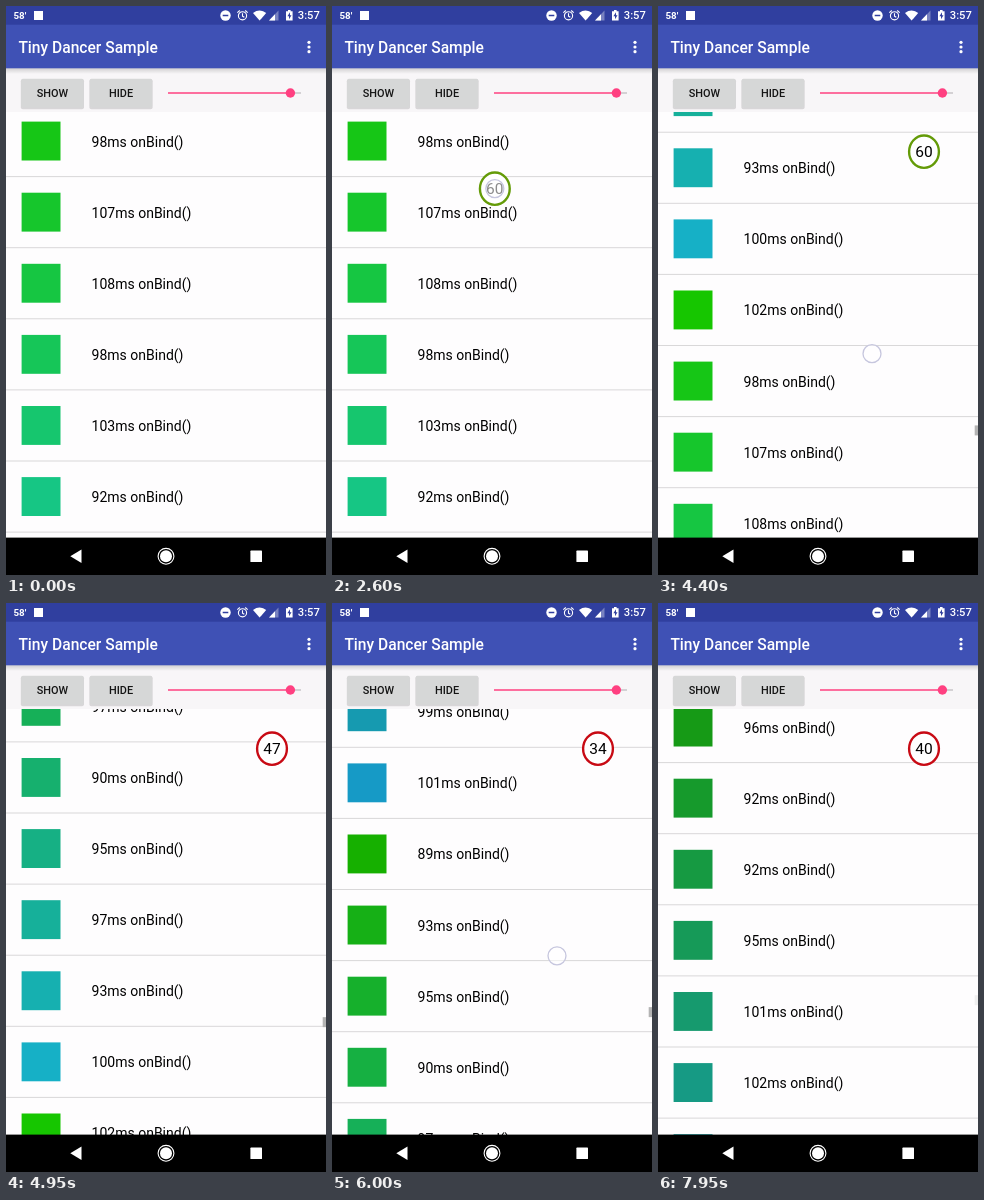
Write an HTML page that moves like this. It is 320x569 px and loops after 8000 ms.

```html
<!DOCTYPE html>
<html lang="en">
<head>
<meta charset="utf-8">
<title>Tiny Dancer Sample</title>
<style>
html, body { margin: 0; width: 100%; height: 100%; overflow: hidden; background: #fff; }
svg { display: block; width: 100vw; height: 100vh; font-family: Roboto, Inter, sans-serif; }
.caps { font-size: 10.9px; font-weight: 500; text-anchor: middle; fill: #141414; }
</style>
</head>
<body>
<svg viewBox="0 0 320 569" preserveAspectRatio="none">
  <defs>
    <clipPath id="listClip"><rect y="106" width="320" height="426"/></clipPath>
    <linearGradient id="shade" x2="0" y2="1">
      <stop stop-color="#000" stop-opacity=".16"/>
      <stop offset="1" stop-color="#000" stop-opacity="0"/>
    </linearGradient>
  </defs>
  <rect width="320" height="569" fill="#fefdfe"/>
  <g clip-path="url(#listClip)"><g id="list" font-size="14"></g></g>
  <rect id="scrollbar" x="316.7" width="3.3" height="10" fill="#b4b4b4"/>

  <rect y="62" width="320" height="44" fill="#f8f6f8"/>
  <rect y="62" width="320" height="6" fill="url(#shade)"/>
  <g id="buttons"></g>
  <path d="M284 87H295" stroke="#c4c2c4" stroke-width="1.4"/>
  <path d="M162 87H284" stroke="#ff4081" stroke-width="1.5"/>
  <circle cx="284.4" cy="87" r="4.7" fill="#ff4081"/>

  <rect width="320" height="62.3" fill="#3f51b5"/>
  <rect width="320" height="18.7" fill="#303f9f"/>
  <text x="12.4" y="46.7" font-size="15.6" font-weight="500" fill="#fff">Tiny Dancer Sample</text>
  <g fill="#fff">
    <circle cx="303" cy="36.3" r="1.6"/><circle cx="303" cy="41" r="1.6"/><circle cx="303" cy="45.7" r="1.6"/>
    <text x="7.5" y="13" font-size="9.8" font-weight="700">58'</text>
    <rect x="28" y="5" width="9" height="9"/>
    <circle cx="219.5" cy="9.5" r="5.2"/>
    <path d="M216.7 9.5h5.6" stroke="#303f9f" stroke-width="1.5"/>
    <g fill="none" stroke="#fff" stroke-width="1.1">
      <circle cx="236.5" cy="9.8" r="4.1"/>
      <path d="M236.5 7.3v2.8l1.8 1.2M231.3 6.6l2.5-2.1M241.7 6.6l-2.5-2.1"/>
    </g>
    <path d="M247 7Q253.6 2.2 260.2 7L253.6 14.6Z"/>
    <path d="M263 14.4L272.5 4.6V14.4Z" opacity=".35"/>
    <path d="M263 14.4L269 8.2V14.4Z"/>
    <path d="M280 5.2h2v-1.1h2.6v1.1h2v9.2H280Z"/>
    <path d="M284 6.2l-2.6 4h1.6v3l2.5-4h-1.5Z" fill="#303f9f"/>
    <text x="291.8" y="13.4" font-size="11.2" font-weight="500">3:57</text>
  </g>

  <rect y="531.6" width="320" height="37.4"/>
  <g fill="#fff">
    <path d="M64.3 550.3L75.5 543.6V557Z"/>
    <circle cx="160" cy="550.3" r="6"/>
    <circle cx="160" cy="550.3" r="7.9" fill="none" stroke="#fff" stroke-width="1.1"/>
    <rect x="244.4" y="544.5" width="11.6" height="11.6" rx=".7"/>
  </g>

  <g id="meter">
    <ellipse id="ring" rx="14.9" ry="16.2" fill="#fff" stroke-width="2.4"/>
    <text id="fps" y="5.6" font-size="15.5" text-anchor="middle"></text>
  </g>
  <circle id="finger" r="9" fill="#fff" fill-opacity=".55" stroke="#c6c6de" stroke-width="1.3"/>
</svg>
<script>
const LOOP = 8000, PITCH = 71.1, FIRST_Y = 135, FIRST_COLOR = 191;
const $ = id => document.getElementById(id);
const clamp = x => Math.max(0, Math.min(1, x));
const smooth = x => x * x * (3 - 2 * x);
const ramp = (t, a, b) => clamp((t - a) / (b - a));

// Bind times from the topmost row reached down to the last one shown at rest.
const bindTimes = [96, 92, 92, 95, 101, 102, 100, 99, 101, 89, 93, 95, 90, 97,
  90, 95, 97, 93, 100, 102, 98, 107, 108, 98, 103, 92, 97];
const ROWS_ABOVE = 20;

// Each decimal digit of the position drives one colour channel.
function rowColor(position) {
  const digits = [Math.floor(position / 100), Math.floor(position / 10) % 10, position % 10];
  return `rgb(${digits.map(d => d * 22)})`;
}

$('list').innerHTML = [95, ...bindTimes].map((ms, i) => {
  const k = i - 1 - ROWS_ABOVE, y = FIRST_Y + k * PITCH;
  return `<rect x="15.6" y="${y - 19.4}" width="38.9" height="38.9" fill="${rowColor(FIRST_COLOR + k)}"/>
    <text x="85.6" y="${y + 5.5}">${ms}ms onBind()</text>
    <rect y="${y + 35.1}" width="320" height="1" fill="#d9d8d9"/>`;
}).join('');

$('buttons').innerHTML = [['SHOW', 46.4], ['HIDE', 115]].map(([label, x]) =>
  `<rect x="${x - 31.6}" y="73.2" width="63.2" height="30" rx="2" fill="#000" opacity=".13"/>
   <rect id="${label}" x="${x - 31.2}" y="72.7" width="62.4" height="28.9" rx="1.6" fill="#d6d7d7"/>
   <text class="caps" x="${x}" y="91.2">${label}</text>`).join('');

// Each swipe drags the list, then lets it coast until the next one begins.
const swipes = [
  { start: 3778, end: 4380, distance: 234, x: 210, y: 341 },
  { start: 4380, end: 5010, distance: 235, x: 214, y: 342 },
  { start: 5010, end: 5500, distance: 213, x: 220, y: 345 },
  { start: 5500, end: 5995, distance: 215, x: 224, y: 348 },
  { start: 5995, end: 6598, distance: 185, x: 225, y: 352 },
  { start: 6598, end: 7600, distance: 329, x: 218, y: 342 },
];
const TOUCH_LEAD = 45, TOUCH_HOLD = 190;

const swipeOffset = (s, t) => s.distance * smooth(ramp(t, s.start, s.end) ** 0.7);
const scrollAt = t => swipes.reduce((sum, s) => sum + swipeOffset(s, t), 0);

function meterAt(t) {
  const p = smooth(ramp(t, 2100, 3160));
  return [75.3 + 190.7 * p, 214 - 68.3 * p];
}

function fingerAt(t) {
  if (t >= 1250 && t < 1350) return [46, 89];
  if (t >= 2100 && t < 3300) return meterAt(t);
  const swipe = swipes.find(s => t >= s.start - TOUCH_LEAD && t < s.start + TOUCH_HOLD);
  return swipe && [swipe.x, swipe.y + swipeOffset(swipe, t)];
}

const fpsAt = t => t < 4424 ? 60 : t < 5160 ? 47 : t < 7368 ? 34 : 40;

function render(t) {
  const scroll = Math.round(scrollAt(t));
  $('list').setAttribute('transform', `translate(0 ${scroll})`);
  $('scrollbar').setAttribute('y', 425 - scroll / 43);
  $('scrollbar').setAttribute('opacity', t < swipes[0].start ? 0 : 1 - ramp(t, 7750, 8000));

  $('SHOW').setAttribute('fill', t >= 1250 && t < 1450 ? '#c4c5c5' : '#d6d7d7');

  const fps = fpsAt(t);
  $('meter').setAttribute('transform', `translate(${meterAt(t)})`);
  $('meter').setAttribute('opacity', smooth(ramp(t, 1345, 2045)));
  $('ring').setAttribute('stroke', fps > 50 ? '#649b08' : '#c80a14');
  $('fps').textContent = fps;

  const finger = fingerAt(t);
  $('finger').setAttribute('opacity', finger ? 1 : 0);
  if (finger) $('finger').setAttribute('transform', `translate(${finger})`);
}

const start = performance.now();
function tick() {
  render((performance.now() - start) % LOOP);
  requestAnimationFrame(tick);
}
tick();
</script>
</body>
</html>
```
